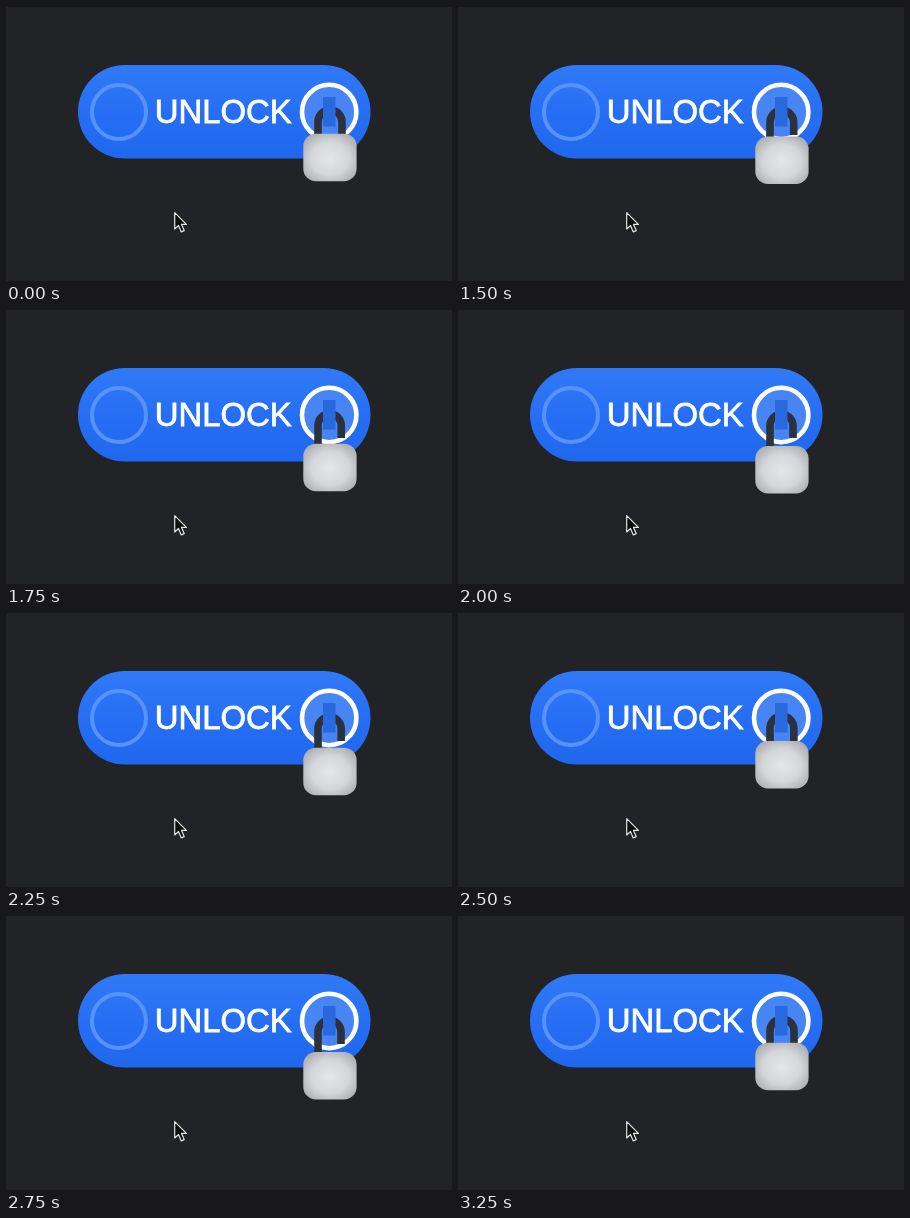
Write an HTML page that moves like this. It is 446 by 275 pixels and loops after 5.75 s.

```html
<!DOCTYPE html>
<html lang="en">
<head>
<meta charset="utf-8">
<title>Unlock slider</title>
<style>
  html, body { margin: 0; width: 100%; height: 100%; overflow: hidden; background: #222326; }
  svg { display: block; width: 100vw; height: 100vh; }
  text { font: 32.9px "Liberation Sans", Arial, sans-serif; }
</style>
</head>
<body>
<svg viewBox="0 0 446 275">
  <defs>
    <linearGradient id="pill" x2="0" y2="1">
      <stop stop-color="#3079f6"/>
      <stop offset=".5" stop-color="#266ff4"/>
      <stop offset="1" stop-color="#1f68ee"/>
    </linearGradient>
    <radialGradient id="metal" cx=".5" cy=".52" r=".7">
      <stop stop-color="#e5e6ea"/>
      <stop offset=".5" stop-color="#d5d6da"/>
      <stop offset="1" stop-color="#9fa0a4"/>
    </radialGradient>
  </defs>
  <rect width="446" height="275" fill="#222326"/>
  <rect width="446" height="1" fill="#18191b"/>
  <rect x="72" y="59" width="292.5" height="93.5" rx="46.75" fill="url(#pill)"/>
  <circle cx="113" cy="106" r="27" fill="none" stroke="#5592fa" stroke-width="4"/>
  <text x="148.7" y="116.6" fill="#fff" stroke="#fff" stroke-width=".8">UNLOCK</text>
  <circle cx="323.2" cy="106" r="27.2" fill="#4784f4" stroke="#fff" stroke-width="4.6"/>
  <path id="shackle" fill="none" stroke="#2c323d" stroke-width="7.6"/>
  <rect x="317" y="91" width="12.5" height="29.5" fill="#2869dd"/>
  <rect id="body" x="297.3" width="53.3" height="47.5" rx="12.5" fill="url(#metal)"/>
  <path d="M168.7 206.6v16.4l3.8-3.5 2.8 6.4 2.9-1.3-2.7-6.2h4.9z" fill="#0c0c0d" stroke="#e4e4e4" stroke-width="1.2" stroke-linejoin="round"/>
</svg>
<script>
  const LOOP = 5750;
  // [start in ms, drop of the padlock in px]
  const steps = [[0, 0], [1500, 2.8], [1750, 7], [2000, 9.3], [2250, 8], [2500, 1.3], [2750, 9.3], [3250, 0]];
  const shackle = document.getElementById("shackle");
  const body = document.getElementById("body");

  function draw(time) {
    const drop = steps.filter(([start]) => start <= time).pop()[1];
    const pull = drop / 9.3;
    const half = 12 - pull * 0.5;
    const left = 312, right = left + 2 * half;
    const bend = 104 + pull * 1.2 + half;
    // the long arm follows the body, the short one slips out of it
    shackle.setAttribute("d",
      `M${left} ${132 + drop}V${bend}A${half} ${half} 0 0 1 ${right} ${bend}V129`);
    body.setAttribute("y", 127.7 + drop);
  }

  const begin = performance.now();
  function tick() {
    draw((performance.now() - begin) % LOOP);
    requestAnimationFrame(tick);
  }
  tick();
</script>
</body>
</html>
```
